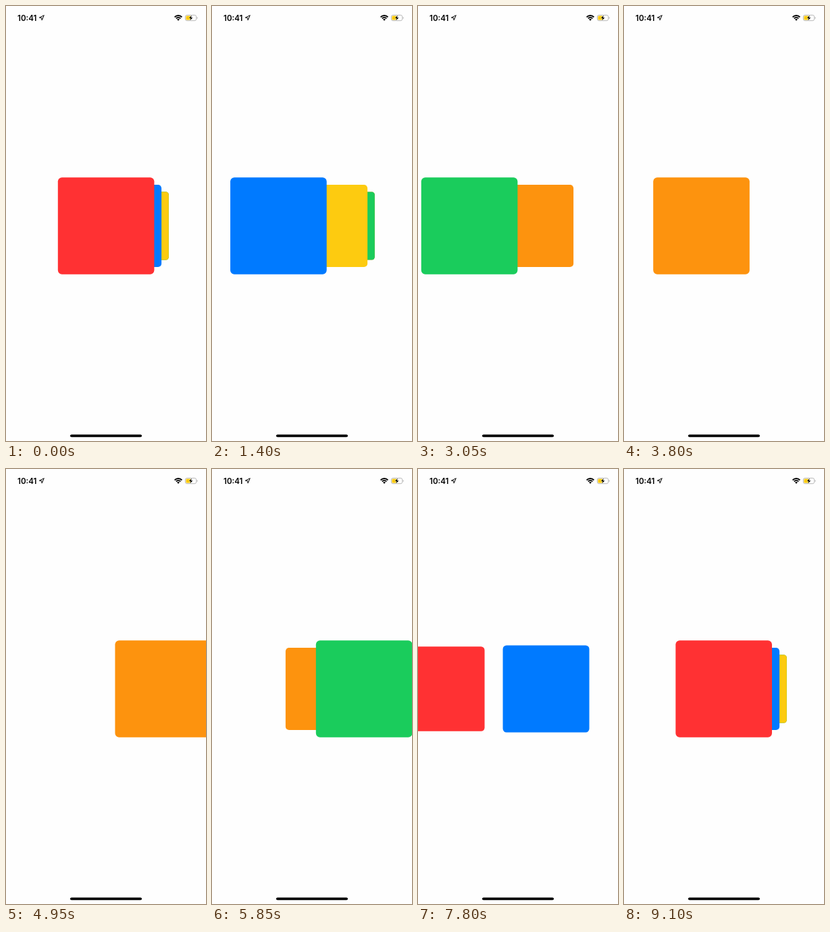
Animation, 296 px wide and 640 px high, one loop 9.15 s. Source, as an HTML page:

```html
<!DOCTYPE html>
<html lang="en">
<head>
<meta charset="utf-8">
<title>Card stack</title>
<style>
  html, body { margin: 0; width: 100%; height: 100%; overflow: hidden; background: #fefefe; }
  svg { display: block; }
  text { font: 600 11.6px Inter, sans-serif; }
</style>
</head>
<body>
<svg width="296" height="640" viewBox="0 0 296 640">
  <g id="cards"></g>

  <text x="17" y="21.6">10:41</text>
  <path d="M56.3 13.7 L49.4 17.1 L52.8 17.4 L53.1 20.9 Z" fill="none" stroke="#000" stroke-width="1" stroke-linejoin="round"/>
  <g fill="none" stroke="#000" stroke-width="1.9">
    <path d="M249.6 16.3 A7.4 7.4 0 0 1 260.4 16.3"/>
    <path d="M251.7 18.4 A4.7 4.7 0 0 1 258.3 18.4"/>
  </g>
  <path d="M255 21.8 L253.1 19.8 A2.7 2.7 0 0 1 256.9 19.8 Z"/>
  <rect x="265.4" y="13.4" width="16.2" height="8.2" rx="2.4" fill="none" stroke="#aaa" stroke-width=".8"/>
  <path d="M282.6 16 a1.6 1.6 0 0 1 0 3 z" fill="#aaa"/>
  <rect x="266.4" y="14.4" width="7" height="6.2" rx="1.4" fill="#fdcb10"/>
  <path d="M274.9 13.4 L270.9 18 H273.3 L272.3 21.6 L276.3 16.9 H273.9 Z" stroke="#fefefe" stroke-width=".6" paint-order="stroke"/>
  <rect x="95" y="630.4" width="106" height="3.8" rx="1.9"/>
</svg>
<script>
const LOOP = 9150, SIZE = 142.6, CENTER = { x: 148.1, y: 323.5 };
const COLORS = ["#ff3133", "#007aff", "#fdcb10", "#1acc5c", "#fd930e"];

// Swipes: drag start, release, drag distance, change of the front card
const SWIPES = [
  [375, 700, -125, 1],
  [1320, 1540, -135, 1],
  [2070, 2240, -123, 1],
  [2930, 3140, -125, 1],
  [3750, 3940, -125, 0],
  [4680, 4940, 85, -1],
  [5640, 5880, 87.6, -1],
  [6500, 6665, 69, -1],
  [7380, 7620, 85, -1],
  [8240, 8480, 80, 0]
];

const group = document.getElementById("cards");
const cards = COLORS.map(color => {
  const card = document.createElementNS("http://www.w3.org/2000/svg", "rect");
  const attrs = { x: -SIZE / 2, y: -SIZE / 2, width: SIZE, height: SIZE, rx: 6, fill: color };
  for (const name in attrs) card.setAttribute(name, attrs[name]);
  group.prepend(card);
  return card;
});

// Resting place for a card at a given depth; negative depths are off to the left
function pose(depth) {
  if (depth < 0) return { x: -355, scale: 0.6 };
  const d = Math.min(depth, 2);
  return { x: 21.4 * d, scale: 1 - 0.15 * d };
}

// Slightly underdamped spring from 0 to 1
function spring(seconds) {
  const omega = 2 * Math.PI / 0.55, zeta = 0.825, root = Math.sqrt(1 - zeta * zeta);
  const a = omega * root * seconds;
  return 1 - Math.exp(-zeta * omega * seconds) * (Math.cos(a) + zeta / root * Math.sin(a));
}

function draw(time) {
  let front = 0, next = 0, drag = 0, p = 0;
  for (const [start, release, distance, step] of SWIPES) {
    if (time < start) break;
    front = next;
    next += step;
    drag = distance * Math.min(1, (time - start) / (release - start));
    p = spring(Math.max(0, time - release) / 1000);
  }
  cards.forEach((card, i) => {
    const from = pose(i - front), to = pose(i - next);
    if (i === front) from.x += drag;
    const x = CENTER.x + from.x + (to.x - from.x) * p;
    const scale = from.scale + (to.scale - from.scale) * p;
    card.setAttribute("transform", `translate(${x} ${CENTER.y}) scale(${scale})`);
  });
}

function tick() {
  draw(performance.now() % LOOP);
  requestAnimationFrame(tick);
}
tick();
</script>
</body>
</html>
```
